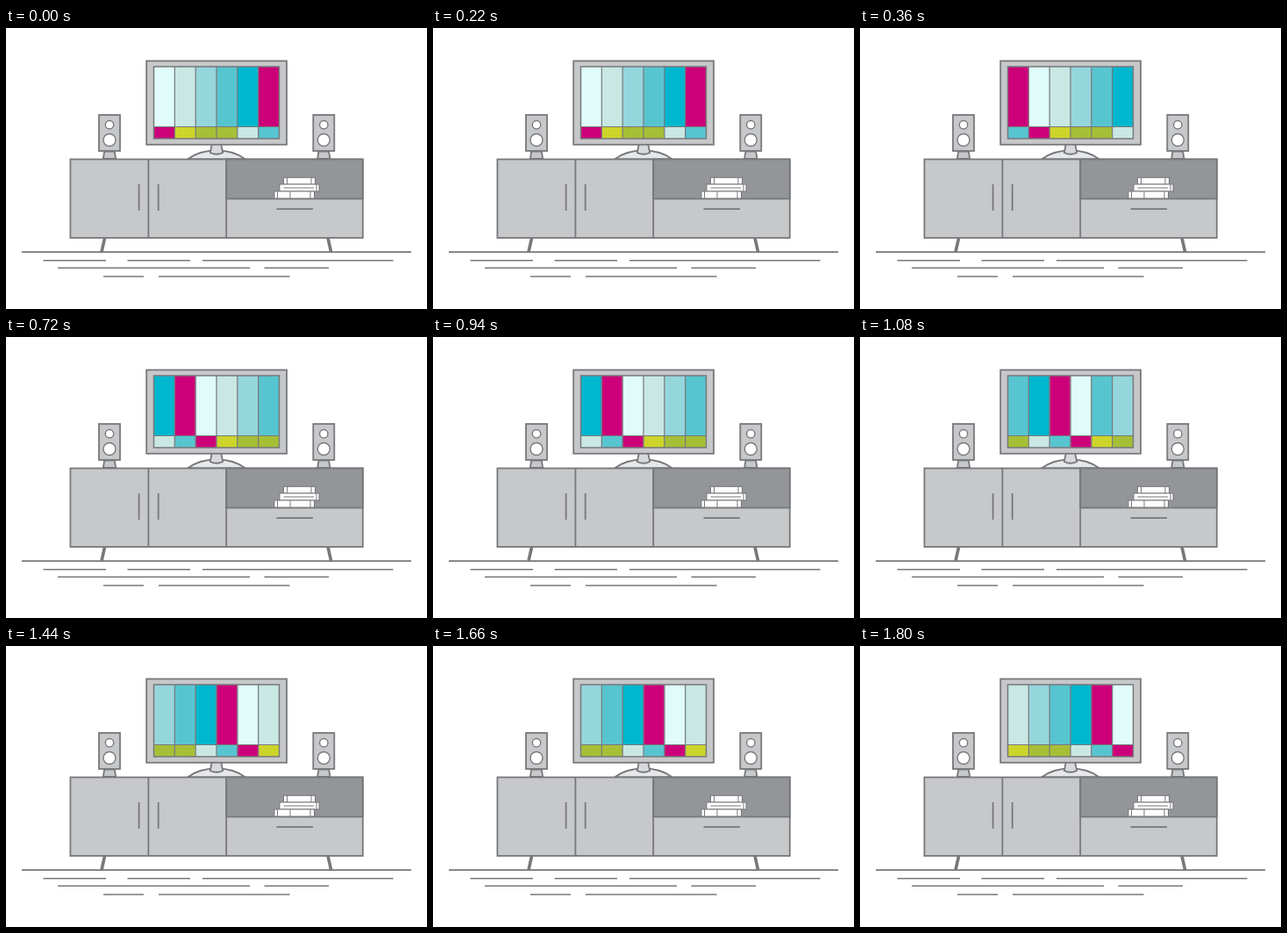
These frames come from a looping animation (480 px wide and 320 px high, 2160 ms). An HTML page:

```html
<!DOCTYPE html>
<html lang="en">
<head>
<meta charset="utf-8">
<title>TV test bars</title>
<style>
  html, body { margin: 0; width: 100%; height: 100%; overflow: hidden; background: #fff; }
  svg { display: block; }
  .line { stroke: #77787b; fill: none; }
  .body { stroke: #77787b; stroke-width: 1.8; fill: #c7c8ca; }
  .white { fill: #fff; }
  .strip { animation: shift 2160ms steps(6, end) infinite; }
  .swap { opacity: 0; animation: swap 2160ms step-end infinite; }
  @keyframes shift { to { transform: translateX(143px); } }
  @keyframes swap {
    0% { opacity: 0; }
    50% { opacity: 1; }
    66.6667%, 100% { opacity: 0; }
  }
</style>
</head>
<body>
<svg width="480" height="320" viewBox="0 0 480 320">
  <defs>
    <clipPath id="screen"><rect x="168.5" y="44" width="143" height="82"/></clipPath>
    <g id="speaker" class="body">
      <path d="M-5.8 140.5L-7.2 149H7.2L5.8 140.5Z"/>
      <rect x="-12" y="99" width="24" height="41"/>
      <g class="white" stroke-width="1.4">
        <circle cy="110.2" r="4.7"/>
        <circle cy="127.5" r="7"/>
      </g>
    </g>
  </defs>

  <!-- television -->
  <path class="body" style="fill:#e6e7e8" stroke-width="1.5" d="M207 149.5Q220 139.5 240 139.5T273 149.5Z"/>
  <path class="body" style="fill:#d8d9db" d="M234.8 132L232.8 142Q240 145.5 247.2 142L245.2 132Z"/>
  <rect class="body" x="160.2" y="37.5" width="159.8" height="95.3"/>
  <g clip-path="url(#screen)">
    <g class="strip" id="strip"></g>
    <g class="swap">
      <rect x="263.83" y="44" width="23.84" height="68.5" fill="#57c5d0"/>
      <rect x="287.67" y="44" width="23.84" height="68.5" fill="#95d6dc"/>
    </g>
  </g>
  <path class="line" id="grid" stroke-width="1.2"/>
  <rect class="line" x="168.5" y="44" width="143" height="82" stroke-width="1.5"/>

  <use href="#speaker" x="118"/>
  <use href="#speaker" x="362.3"/>

  <!-- cabinet -->
  <path class="line" stroke-width="3.6" d="M112.6 239L109 255M367 239L370.6 255"/>
  <rect class="body" x="73.4" y="149.5" width="333.4" height="89.5"/>
  <rect class="body" style="fill:#939598" x="251.2" y="149.5" width="155.6" height="45"/>
  <path class="line" stroke-width="1.8" d="M162.4 149.5V239M251.2 149.5V239M151.6 178V208M173.7 178V208M308.5 206.2H350"/>

  <!-- books -->
  <g class="line white" style="fill:#fff" stroke-width="1">
    <rect x="316.5" y="170.3" width="36" height="7.7"/>
    <rect x="312" y="178" width="45" height="8"/>
    <rect x="306" y="186" width="45.5" height="8"/>
    <path d="M320.5 170.3V178M348 170.3V178M316.5 182H351M354 178V186M309.5 186V194M324 186V194M347 186V194"/>
  </g>

  <!-- floor -->
  <path class="line" stroke-width="1.8" d="M18 255.2H462"/>
  <path class="line" stroke-width="1.4" d="M42.5 264.8H114M138.5 264.8H210M224 264.8H441.5M59 273.3H278M294.5 273.3H368M111 283H157M174 283H323.5"/>
</svg>
<script>
  const left = 168.5, top_ = 44, split = 112.5, bottom = 126, step = 143 / 6;
  const tall = ['#dffcfb', '#c9e8e4', '#95d6dc', '#57c5d0', '#00b7cf', '#cc0079'];
  const short = ['#cc0079', '#cdd52b', '#a7bf37', '#a7bf37', '#c9e8e4', '#57c5d0'];

  const bar = (i, y, end, colors) =>
    `<rect x="${left + i * step}" y="${y}" width="${step + 0.1}" height="${end - y}" fill="${colors[(i + 6) % 6]}"/>`;

  // A second copy waits to the left, so the shift wraps around.
  let bars = '';
  for (let i = -6; i < 6; i++) {
    bars += bar(i, top_, split, tall) + bar(i, split, bottom, short);
  }
  document.getElementById('strip').innerHTML = bars;

  let grid = `M${left} ${split}h143`;
  for (let i = 1; i < 6; i++) grid += `M${left + i * step} ${top_}V${bottom}`;
  document.getElementById('grid').setAttribute('d', grid);
</script>
</body>
</html>
```
